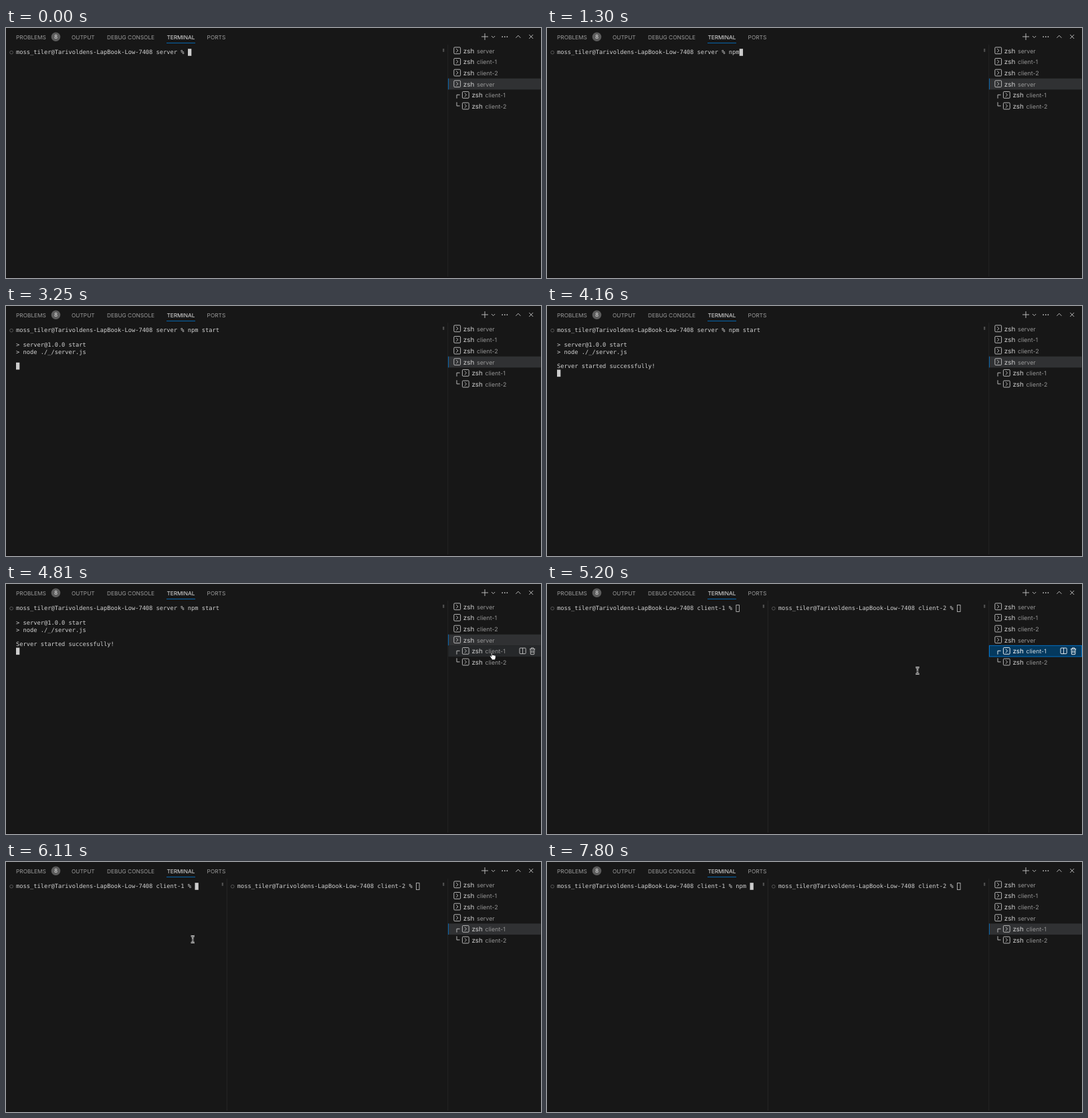
Write an HTML page that moves like this. It is 800 px wide and 375 px high and loops after 8 s.

```html
<!DOCTYPE html>
<html lang="en">
<head>
<meta charset="utf-8">
<title>Terminal panel</title>
<style>
  html, body { margin: 0; width: 100%; height: 100%; overflow: hidden; background: #171717; }
  svg { display: block; width: 800px; height: 375px; }
  text { white-space: pre; text-rendering: geometricPrecision; }
  .mono { font: 8.71px "DejaVu Sans Mono", monospace; fill: #d2d2d2; }
  .tab { font: 8.3px Inter, sans-serif; fill: #9b9b9b; }
  .tab.on { fill: #e4e4e4; }
  .name { font: 9.8px Inter, sans-serif; fill: #d0d0d0; }
  .desc { font: 8.9px Inter, sans-serif; fill: #949494; }
  .line { fill: none; stroke: #c8c8c8; stroke-width: .9; }
  .focus .name { fill: #fff; }
  .focus .desc { fill: #d3dde5; }
  .focus .line { stroke: #fff; }
</style>
</head>
<body>
<svg id="stage" viewBox="0 0 800 375"></svg>
<script>
const LOOP = 8000, STEP = 130;
const CHAR = 5.245, ROW = 10.72, TOP = 31.2;
const SIDE_TOP = 26, SIDE_ROW = 16.63;
const USER = 'moss_tiler@Tarivoldens-LapBook-Low-7408';
const stage = document.getElementById('stage');

function add(parent, tag, attrs = {}, text) {
  const el = document.createElementNS('http://www.w3.org/2000/svg', tag);
  for (const k in attrs) el.setAttribute(k, attrs[k]);
  if (text !== undefined) el.textContent = text;
  parent.append(el);
  return el;
}
const group = (parent = stage) => add(parent, 'g');
const rect = (p, x, y, width, height, fill, more) =>
  add(p, 'rect', { x, y, width, height, fill, ...more });
const label = (p, cls, x, y, text) => add(p, 'text', { class: cls, x, y }, text);
const line = (p, d, more) => add(p, 'path', { class: 'line', d, ...more });
const show = (el, on) => el.setAttribute('visibility', on ? 'inherit' : 'hidden');
const set = (el, attrs) => { for (const k in attrs) el.setAttribute(k, attrs[k]); };

// Panel header
rect(stage, 0, 0, 800, 375, '#171717');
rect(stage, 0, 373, 800, 2, '#151315');
[['PROBLEMS', 15], ['OUTPUT', 98], ['DEBUG CONSOLE', 151], ['TERMINAL', 240.4], ['PORTS', 300.6]]
  .forEach(([name, x]) => label(stage, name === 'TERMINAL' ? 'tab on' : 'tab', x, 16.5, name));
rect(stage, 240, 22, 43, .8, '#0078d4');
add(stage, 'circle', { cx: 74.5, cy: 13.2, r: 6.8, fill: '#5c5c5c' });
add(stage, 'text', { class: 'tab on', x: 74.5, y: 16.2, 'text-anchor': 'middle' }, '8');
line(stage, 'M711 13H721M716 8V18M726 12l2.6 2.6 2.6-2.6M762.4 14.8l3.5-3.6 3.5 3.6M782.2 10l6 6m0-6l-6 6');
for (const cx of [742.2, 745.8, 749.4]) add(stage, 'circle', { cx, cy: 13.2, r: .85, fill: '#c8c8c8' });
rect(stage, 660.4, 25, .8, 348, '#272727');

// Terminal panes
function pane(x, end) {
  const g = group();
  add(g, 'circle', { cx: x - 6.9, cy: 36.7, r: 2.4, fill: 'none', stroke: '#626262', 'stroke-width': .8 });
  rect(g, end - 7.3, 31, 2.2, 4.8, '#505050');
  const rows = Array.from({ length: 7 }, (_, i) => label(g, 'mono', x, 39.4 + i * ROW, ''));
  const cursor = rect(g, 0, 0, 5.2, 10.6, '#cccccc', { stroke: '#cccccc', 'stroke-width': 0 });
  return {
    g,
    draw(lines, solid) {
      rows.forEach((r, i) => { r.textContent = lines[i] || ''; });
      const last = lines.length - 1, inset = solid ? 0 : .4;
      set(cursor, {
        x: x + lines[last].length * CHAR + inset, y: TOP + last * ROW + inset,
        width: 5.3 - 2 * inset, height: 10.6 - 2 * inset,
        fill: solid ? '#cccccc' : 'none', 'stroke-width': solid ? 0 : .8
      });
    }
  };
}
const server = pane(15, 660.4);
const split = group();
const left = pane(15, 330), right = pane(345.7, 660.4);
split.append(left.g, right.g);
rect(split, 329.8, 25, .8, 348, '#2a2a2a');

// Terminal list
const sideRows = ['server', 'client-1', 'client-2', 'server', 'client-1', 'client-2'].map((desc, i) => {
  const y = SIDE_TOP + i * SIDE_ROW - .2, mid = y + SIDE_ROW / 2, dx = i > 3 ? 12.6 : 0;
  const g = group();
  const back = rect(g, 661.4, y, 138.2, SIDE_ROW, 'none');
  const bar = rect(g, 661, y, .76, SIDE_ROW, '#0078d4');
  rect(g, 669.8 + dx, mid - 5.2, 9.8, 9.8, 'none', { class: 'line', rx: 1.3 });
  line(g, `M${673.2 + dx} ${mid - 2.9}l2.8 2.6-2.8 2.6`);
  if (i === 4) line(g, `M674 ${mid + 5}v-5.4h4.6`, { 'stroke-width': 1 });
  if (i === 5) line(g, `M674 ${mid - 6}v5.6h4.6`, { 'stroke-width': 1 });
  label(g, 'name', 683.8 + dx, mid + 3.6, 'zsh');
  label(g, 'desc', 704 + dx, mid + 3.6, desc);
  const tools = group(g);
  rect(tools, 768, mid - 4.6, 9.2, 8.6, 'none', { class: 'line', rx: 1 });
  line(tools, `M772.6 ${mid - 4.6}v8.6M783 ${mid - 3.2}h8.2M785.4 ${mid - 3.2}v-1.6h3.4v1.6` +
    `M784 ${mid - 3.2}l.4 7.6q0 .6 .6 .6h4.2q.6 0 .6-.6l.4-7.6M786 ${mid - 1.2}v4M788.2 ${mid - 1.2}v4`);
  return (mode, selected) => {
    const fill = { focus: '#04395e', picked: '#303133', hover: '#26282a' }[mode] || 'none';
    const ring = mode === 'focus' ? { stroke: '#0078d4', 'stroke-width': .9 } : { stroke: 'none' };
    set(back, { fill, ...ring });
    g.setAttribute('class', mode === 'focus' ? 'focus' : '');
    show(bar, selected);
    show(tools, mode === 'hover' || mode === 'focus');
  };
});

// Mouse pointers, each centred on its own origin
const hand = add(stage, 'path', {
  d: 'M-2.4-4.6q0-1 .9-1t.9 1v3q.2-.7 .9-.7t.9 .8q.2-.6 .9-.6t.9 .9q.2-.5 .8-.5.8 0 .8 1v2.4' +
     'q0 1.2-.8 2.2v1.3h-5v-1.2q-.9-.9-1.7-2.4l-1-1.7q-.3-.8 .3-1.1.6-.3 1.2 .4l.8 .9Z',
  fill: '#fff', stroke: '#111', 'stroke-width': .7
});
const beam = group();
const beamPath = 'M-2.6-5q2 0 2.6 1.2q.6-1.2 2.6-1.2M0-3.8V3.8M-2.6 5q2 0 2.6-1.2q.6 1.2 2.6 1.2M-1.2 1H1.2';
line(beam, beamPath, { style: 'stroke:#f0f0f0;stroke-width:2.4' });
line(beam, beamPath, { style: 'stroke:#222;stroke-width:.9' });

const path = [
  [4290, 738, 125], [4550, 733, 119], [4810, 727.6, 108.6], [4940, 727, 108.4],
  [5070, 690, 115], [5200, 554, 130], [5330, 400, 131], [5460, 300, 127.5],
  [5590, 292, 127], [5850, 283, 121], [6110, 279.2, 116]
];
function mouseAt(t) {
  if (t < path[0][0] || t >= 7020) return null;
  const i = path.findIndex(p => p[0] > t);
  if (i < 0) return path[path.length - 1].slice(1);
  const [a, x, y] = path[i - 1], [b, u, v] = path[i], k = (t - a) / (b - a);
  return [x + (u - x) * k, y + (v - y) * k];
}

const typed = (word, keys, t) => word.slice(0, keys.filter(k => k <= t).length);
const startKeys = [520, 1040, 1300, 1560, 1690, 1820, 1950, 2080, 2210];
const clientKeys = [7020, 7410, 7670, 7800];
const OPEN = 5070, CLICK = 5850;

// The last line holds the cursor
function serverLines(t) {
  const lines = [`${USER} server % ${typed('npm start', startKeys, t)}`];
  if (t >= 3250) lines.push('', '> server@1.0.0 start', '> node ./_/server.js', '');
  if (t >= 3640) lines.push('Server started successfully!');
  if (t >= 2990) lines.push('');
  return lines;
}

function draw(time) {
  const t = Math.floor(time / STEP) * STEP;
  const opened = t >= OPEN, focused = t >= CLICK;
  show(server.g, !opened);
  show(split, opened);
  server.draw(serverLines(t), true);
  left.draw([`${USER} client-1 % ${typed('npm ', clientKeys, t)}`], focused);
  right.draw([`${USER} client-2 % `], false);

  const mouse = mouseAt(t);
  const inList = mouse && mouse[0] > 661;
  const over = inList ? Math.floor((mouse[1] - 3 - SIDE_TOP) / SIDE_ROW) : -1;
  const picked = opened ? 4 : 3;
  sideRows.forEach((paint, i) => {
    const mode = i === picked ? (opened && !focused ? 'focus' : 'picked') : i === over ? 'hover' : '';
    paint(mode, i === picked);
  });

  show(hand, inList);
  show(beam, mouse && !inList);
  if (mouse) (inList ? hand : beam).setAttribute('transform', `translate(${mouse[0]} ${mouse[1]})`);
}

const begin = performance.now();
function tick() {
  draw((performance.now() - begin) % LOOP);
  requestAnimationFrame(tick);
}
tick();
</script>
</body>
</html>
```
